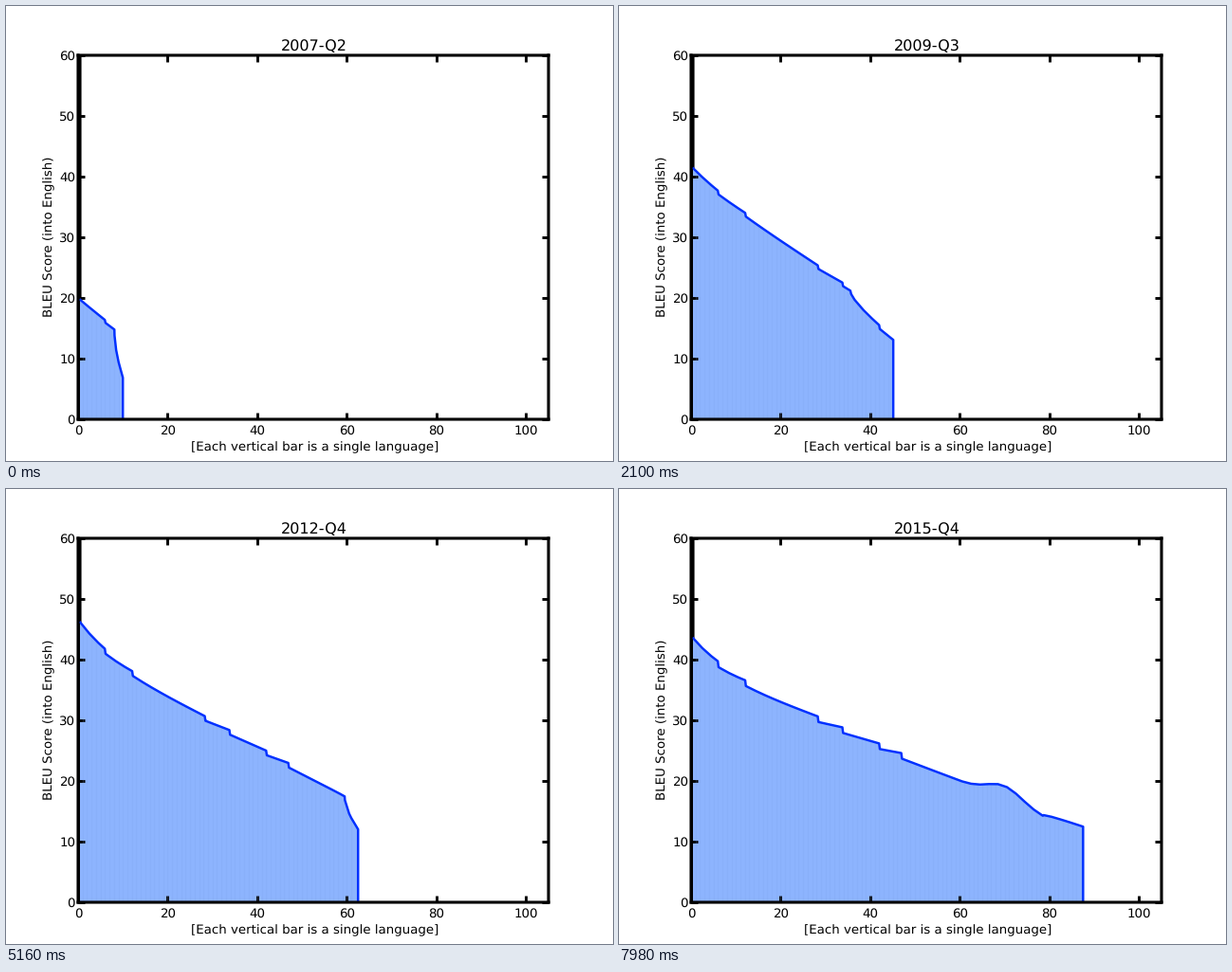
Write a matplotlib script that moves like this. It is 640 by 480 pixels and loops after 8 s.

```python
import numpy as np
import matplotlib.pyplot as plt
from matplotlib.animation import FuncAnimation

W, H, DPI = 640, 480, 80
LOOP, STEP, FRAMES = 8000, 30, 267
QUARTER = .2373  # seconds of animation per calendar quarter

plt.rcParams["font.family"] = "DejaVu Sans"
plt.rcParams["font.size"] = 12
plt.rcParams["text.hinting"] = "none"

# Key moments in seconds; values in between are blended.
KEYS = [0, 1.47, 2.67, 4.14, 5.16, 6.24, 7.29, 7.98]
COUNT = [10, 33, 56.1, 54.9, 62.5, 77.7, 87.4, 87.5]
SLOPE = [.6, .57, .46, .46, .41, .37, .34, .32]
DROP = [6.9, 5.2, 1.8, 4, 4.2, 2, -.5, -1.3]    # fall of the last languages
DROP_WIDTH = [1.9, 4.7, 14, 1.2, 3, 8, 9, 9]

# Ranks at which the scores step down.
STEPS = np.array([6.05, 12.15, 28.35, 33.85, 42.05, 47])
EDGES = np.column_stack([STEPS - .08, STEPS + .08]).ravel()
SAW_X = np.r_[0, EDGES, 58]
SAW_Y = np.r_[0, np.tile([.5, -.5], len(STEPS)), 0]


def curve(t):
    end, slope, drop, width = (np.interp(t, KEYS, track) for track in
                               (COUNT, SLOPE, DROP, DROP_WIDTH))
    xs = np.r_[np.arange(.5, end, 2), EDGES,
               end - width * np.array([1, .98, .5, 0])]
    xs = np.unique(xs[xs <= end])

    level = 19.6 + 22.4 * np.sin(np.pi / 2 * min(1, t / 3))
    level -= .95 * max(0, t - 5)
    lift = min(4.8, .4 + .85 * t)
    bump = 2.4 * np.clip(t - 5.2, 0, 1)
    ys = level - slope * xs + lift * np.exp(-xs / 7)
    ys += (.4 + .06 * t) * np.interp(xs, SAW_X, SAW_Y)
    ys += bump * np.exp(-((xs - 70) / 5.5) ** 2)
    ys -= drop * np.sqrt(np.clip((xs - end) / width + 1, 0, 1))
    return xs, ys


def quarter_name(t):
    q = 1 + int(t / QUARTER + .45)
    return f"{2007 + q // 4}-Q{q % 4 + 1}"


def label(x, y, text="", **style):
    """Text centred on x with its baseline at y, in pixels from the top left."""
    return fig.text(x / W, 1 - y / H, text, ha="center", **style)


fig = plt.figure(figsize=(W / DPI, H / DPI), dpi=DPI, facecolor="white")
ax = fig.add_axes([76 / W, 44 / H, 496 / W, 384 / H])
ax.set(xlim=(0, 105), ylim=(0, 60), xticks=range(0, 101, 20))
ax.tick_params(direction="in", length=6.5, width=2.6, top=True, right=True)
ax.tick_params(axis="x", pad=4.9)
ax.tick_params(axis="y", pad=2.6)
for spine in ax.spines.values():
    spine.set(linewidth=2.8, snap=False)

ax.plot([.45, .45], [0, 60], color="black", lw=2.6, zorder=1, snap=False)
area, = ax.fill([0], [0], color="#8db4fe", lw=0, zorder=1.5)
bars = ax.vlines([], [], [], color="#7fa6f2", lw=1.2, alpha=.25, zorder=1.6)
line, = ax.plot([], [], color="#0030ff", lw=2.2, solid_joinstyle="round",
                zorder=2)

title = label(325, 46.5, size=14.4)
label(325.3, 469, "[Each vertical bar is a single language]")
label(45.5, 243.5, "BLEU Score (into English)", rotation=90, va="center")


def draw(i):
    t = i * STEP / 1000
    xs, ys = curve(t)
    title.set_text(quarter_name(t))
    line.set_data(np.append(xs, xs[-1]), np.append(ys, 0))
    area.set_xy(np.column_stack([np.r_[.42, .42, xs, xs[-1]],
                                 np.r_[0, ys[0], ys, 0]]))
    ranks = np.arange(1, int(np.ceil(xs[-1])))
    tops = np.interp(ranks, xs, ys)
    bars.set_segments([[(x, 0), (x, y)] for x, y in zip(ranks, tops)])
    return title, line, area, bars


anim = FuncAnimation(fig, draw, frames=FRAMES, interval=LOOP / FRAMES,
                     init_func=lambda: draw(0), repeat=True, repeat_delay=0)
plt.show()
```
